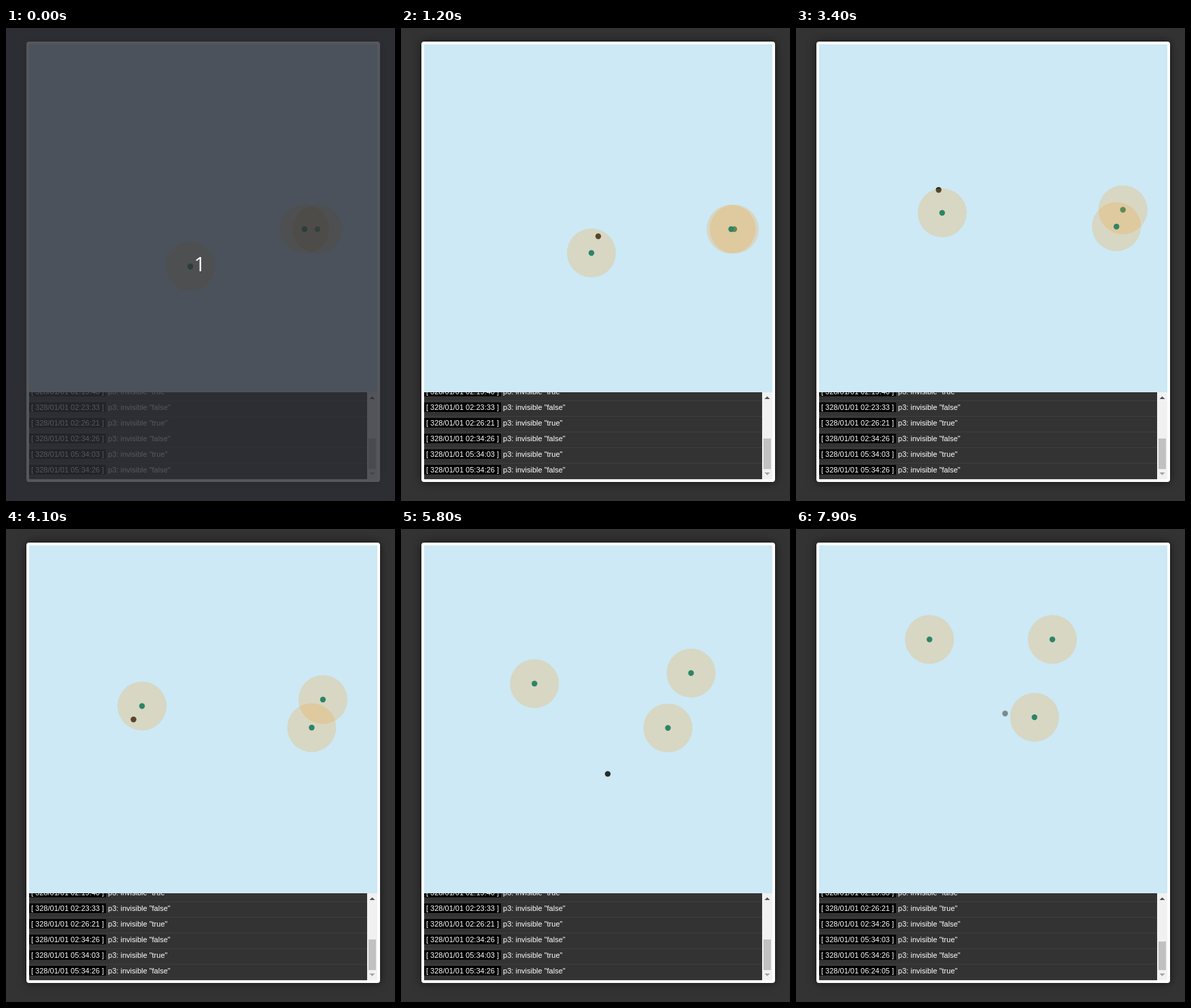
Write an HTML page that moves like this. It is 572x696 px and loops after 8000 ms.

```html
<!DOCTYPE html>
<html lang="en">
<head>
<meta charset="utf-8">
<title>Walkers</title>
<style>
  html, body { margin: 0; width: 100%; height: 100%; overflow: hidden; background: #333; }
  #panel {
    position: absolute; left: 30px; top: 20px; width: 512px; height: 640px;
    border: 4px solid #fff; border-radius: 4px; box-shadow: 0 0 14px rgba(0, 0, 0, .6);
  }
  #arena { display: block; background: #cce9f5; }
  #log {
    position: relative; height: 128px; overflow: hidden; background: #333; color: #fff;
    font: 11px/18px "Liberation Sans", Arial, sans-serif;
  }
  #rows { position: absolute; left: 0; width: 497px; }
  #rows div { height: 22px; border-bottom: 1px solid #3f3f3f; white-space: pre; }
  #rows span { background: #000; padding: 1px 3px; }
  #bar { position: absolute; right: 0; top: 0; width: 15px; height: 128px; background: #f1f1f1; }
  #shade {
    position: absolute; inset: 0; background: rgba(43, 45, 53, .8); color: #fff;
    font: 30px/694px "Open Sans", "Noto Sans", sans-serif; text-align: center; text-indent: -2px;
  }
</style>
</head>
<body>
<div id="panel">
  <svg id="arena" width="512" height="512" viewBox="34 24 512 512"></svg>
  <div id="log">
    <div id="rows"></div>
    <svg id="bar">
      <path d="M3.5 10l4-4 4 4z" fill="#505050"/>
      <path d="M3.5 118l4 4 4-4z" fill="#a3a3a3"/>
      <rect id="thumb" x="2" width="11" fill="#c1c1c1"/>
    </svg>
  </div>
</div>
<div id="shade">1</div>
<script>
const LOOP = 8000, STEP = 100, FADE = 1000, HIDE_AT = 6200;
const RADIUS = 36, WALL = 546 - RADIUS, ROW = 23;
const $ = id => document.getElementById(id);

// All dots steer through one point at each of these times.
// An x beyond WALL is mirrored back, so a straight run bounces off it.
const times = [0, 1200, 2600, 4100, 5800, 6600, 7900];
const ghostPath = {
  x: [271, 290, 250, 187.5, 304, 336.3, 307.5],
  y: [351, 306.5, 208, 280.3, 360.4, 360.4, 271.5]
};
const walkerPaths = [
  { x: [271, 280, 242, 200, 196.3, 197, 196.3], y: [351, 331, 286.5, 260.5, 227.5, 203.5, 162.5] },
  { x: [458, 490, 522.5, 554, 593.5, 612, 643], y: [296, 296, 283, 251, 212, 193.5, 162.5] },
  { x: [439, 485.5, 525, 570.5, 627.5, 654, 669.3], y: [296, 296, 292.3, 292.3, 292.8, 292.3, 277] }
];

// Smooth curve through the values that never overshoots them
function curve(v, t) {
  const slope = i => (v[i + 1] - v[i]) / (times[i + 1] - times[i]);
  const last = times.length - 2;
  const tangent = i => {
    const a = slope(Math.max(i - 1, 0)), b = slope(Math.min(i, last));
    return a * b > 0 ? 2 * a * b / (a + b) : 0;
  };
  const i = Math.max(0, times.findIndex(end => end >= t) - 1);
  const span = times[i + 1] - times[i], k = (t - times[i]) / span, j = 1 - k;
  return v[i] * j * j * (1 + 2 * k) + v[i + 1] * k * k * (3 - 2 * k)
    + span * k * j * (tangent(i) * j - tangent(i + 1) * k);
}

function svg(parent, name, attributes = {}) {
  const node = document.createElementNS("http://www.w3.org/2000/svg", name);
  for (const key in attributes) node.setAttribute(key, attributes[key]);
  return parent.appendChild(node);
}

function addDot(path, fill, halo) {
  const node = svg($("arena"), "g");
  if (halo) svg(node, "circle", { r: RADIUS, fill: halo });
  svg(node, "circle", { r: 4.2, fill });
  return { node, path };
}

function place({ node, path }, t) {
  const x = WALL - Math.abs(WALL - curve(path.x, t));
  node.setAttribute("transform", `translate(${x} ${curve(path.y, t)})`);
}

const ghost = addDot(ghostPath, "#282c29");
const walkers = walkerPaths.map(path => addDot(path, "#2e8466", "rgba(250,155,30,.23)"));

const stamps = ["02:19:40", "02:23:33", "02:26:21", "02:34:26", "05:34:03", "05:34:26", "06:24:05"];
$("rows").innerHTML = stamps.map((stamp, i) =>
  `<div><span>[ 328/01/01 ${stamp} ]</span> p3: invisible "${i % 2 === 0}"</div>`).join("");

function draw(now) {
  const t = Math.floor(now % LOOP / STEP) * STEP;
  const hidden = t >= HIDE_AT;
  [ghost, ...walkers].forEach(dot => place(dot, t));
  ghost.node.setAttribute("opacity", hidden ? .5 : 1);

  $("rows").style.top = -10 - (hidden ? ROW : 0) + "px";
  $("thumb").setAttribute("y", hidden ? 71 : 68);
  $("thumb").setAttribute("height", hidden ? 42 : 45);
  $("shade").style.opacity = Math.max(0, 1 - t / FADE);
}

const start = performance.now();
function tick() {
  draw(performance.now() - start);
  requestAnimationFrame(tick);
}
tick();
</script>
</body>
</html>
```
